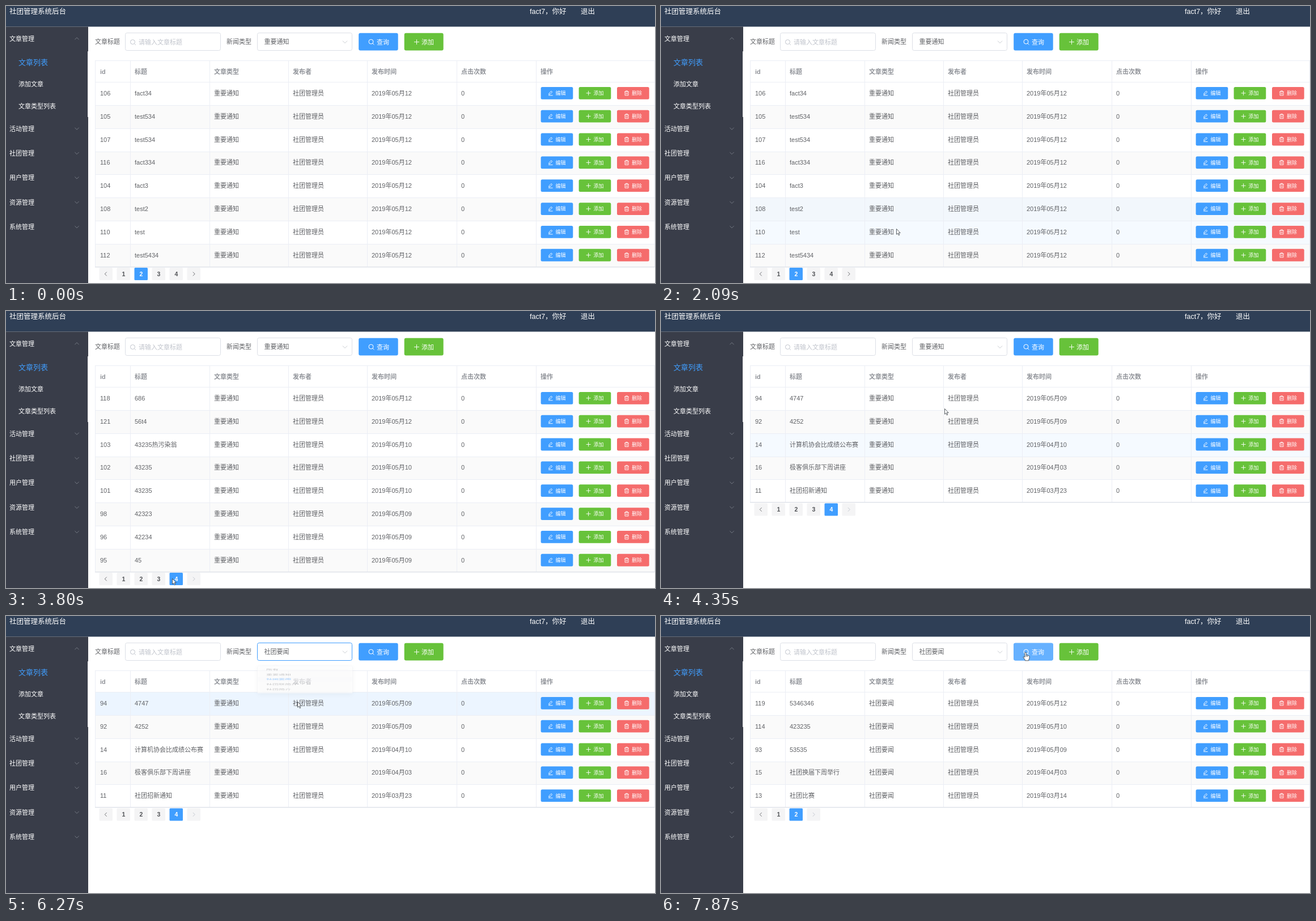
An HTML page with a canvas for the animation above (8 s loop, 1145 by 489 pixels).

```html
<!DOCTYPE html>
<html lang="zh-CN">
<head>
<meta charset="utf-8">
<title>后台列表</title>
<style>
  html, body { margin: 0; width: 100%; height: 100%; overflow: hidden; background: #fff; }
  canvas { display: block; }
</style>
</head>
<body>
<canvas id="stage" width="1145" height="489"></canvas>
<script>
const ctx = document.getElementById('stage').getContext('2d');
const FONT = '"Liberation Sans", "Noto Sans CJK SC", "Noto Sans CJK", sans-serif';
const LOOP = 8000, STEP = 77.9, ROW_H = 40.85, TOP = 134;
const BLUE = '#409eff', GREEN = '#67c23a', RED = '#f56c6c';
const INK = '#606266', PALE = '#c0c4cc', RULE = '#ebeef5';
const COLS = [157, 219, 359, 498, 637, 795, 935];
const HEADS = ['id', '标题', '文章类型', '发布者', '发布时间', '点击次数', '操作'];
const OPTIONS = ['所有', '重要通知', '社团要闻', '社团联简介', '社团简介'];
const NOTICE = OPTIONS[1], NEWS = OPTIONS[2];

// Each row: id, title, date, optional "-" for no publisher
const table = (type, pages, page, text) => ({
  type, pages, page, rows: text.split('|').map(r => r.split(' '))
});
const SECOND = table(NOTICE, 4, 2, '106 fact34 05月12|105 test534 05月12|107 test534 05月12|116 fact334 05月12|' +
  '104 fact3 05月12|108 test2 05月12|110 test 05月12|112 test5434 05月12');
const THIRD = table(NOTICE, 4, 3, '118 686 05月12|121 56t4 05月12|103 43235热污染翁 05月10|102 43235 05月10|' +
  '101 43235 05月10|98 42323 05月09|96 42234 05月09|95 45 05月09');
const FOURTH = table(NOTICE, 4, 4, '94 4747 05月09|92 4252 05月09|14 计算机协会比成绩公布赛 04月10|' +
  '16 极客俱乐部下周讲座 04月03 -|11 社团招新通知 03月23');
const LATEST = table(NEWS, 2, 2, '119 5346346 05月12|114 423235 05月10|93 53535 05月09|' +
  '15 社团换届下周举行 04月03|13 社团比赛 03月14');

// Pointer path: time, x, y
const PATH = [
  [230, 420, 452], [620, 455, 270], [1010, 540, 85], [1245, 592, 74], [1320, 631, 67],
  [1400, 630, 72], [1860, 470, 366], [2300, 370, 415], [2720, 270, 472], [3345, 270, 472],
  [3570, 293, 472], [3980, 293, 472], [4362, 499.5, 172], [4750, 512, 72], [4985, 512, 72],
  [5500, 512, 101], [5600, 512, 101], [5780, 498, 135], [5930, 490, 160], [6080, 490, 160],
  [6400, 540, 142], [6870, 647, 66], [6950, 645, 63], [7760, 645, 63], [7780, 643, 64]
];

function pointer(t) {
  if (t < 225) return null;
  const i = PATH.findIndex(p => p[0] > t);
  if (i === 0) return PATH[0].slice(1);
  if (i < 0) return PATH[PATH.length - 1].slice(1);
  const [a, b] = [PATH[i - 1], PATH[i]], f = (t - a[0]) / (b[0] - a[0]);
  return [a[1] + (b[1] - a[1]) * f, a[2] + (b[2] - a[2]) * f];
}

const isOpen = t => t > 4980 && t < 6070;
const dataAt = t => t < 2865 ? SECOND : t < 3800 ? THIRD : t < 7240 ? FOURTH : LATEST;
const pageAt = t => t < 2785 ? 2 : t < 3725 ? 3 : t < 7240 ? 4 : 2;
const bottomOf = d => TOP + ROW_H * d.rows.length;

// What lies under the pointer at time t
function under(t) {
  const p = pointer(t);
  if (!p) return '';
  const [x, y] = p, data = dataAt(t), end = bottomOf(data);
  if (y > 47 && y < 79) {
    if (x > 443 && x < 611) return 'select';
    if (x > 622 && x < 692) return 'search';
  }
  if (isOpen(t) && x > 443 && x < 611 && y > 88 && y < 229)
    return 'option' + Math.max(0, Math.min(4, Math.floor((y - 93) / 26.1)));
  if (y > TOP && y < end) return 'row' + Math.floor((y - TOP) / ROW_H);
  const n = Math.round((x - 207.5) / 31) + 1;
  if (Math.abs(y - end - 12) < 11 && n > 0 && n <= data.pages && n !== pageAt(t)) return 'page' + n;
  return '';
}

// Hover strength, trailing the pointer by one step
function glow(id, k) {
  let a = 0;
  for (let j = 6; j > 0; j--)
    a = Math.max(0, Math.min(1, a + (under((k - j) * STEP) === id ? .5 : -.5)));
  return a;
}

function text(s, x, cy, color = INK, size = 11, weight = 400, align = 'left') {
  ctx.font = `${weight} ${size}px ${FONT}`;
  ctx.textAlign = align;
  ctx.fillStyle = color;
  ctx.fillText(s, x, cy + size * .37);
}

function rect(x, y, w, h, color) {
  ctx.fillStyle = color;
  ctx.fillRect(x, y, w, h);
}

function box(x, y, w, h, r, fill, stroke) {
  ctx.beginPath();
  ctx.roundRect(x, y, w, h, r);
  if (fill) { ctx.fillStyle = fill; ctx.fill(); }
  if (stroke) { ctx.strokeStyle = stroke; ctx.lineWidth = 1; ctx.stroke(); }
}

function line(color, ...pts) {
  ctx.beginPath();
  for (let i = 0; i < pts.length; i += 2) ctx.lineTo(pts[i], pts[i + 1]);
  ctx.strokeStyle = color;
  ctx.lineWidth = .9;
  ctx.stroke();
}

function faded(alpha, draw) {
  if (alpha <= 0) return;
  ctx.save();
  ctx.globalAlpha = alpha;
  draw();
  ctx.restore();
}

const chevron = (x, y, dir, color, s = 3.6) =>
  line(color, x - s, y - dir * s / 2, x, y + dir * s / 2, x + s, y - dir * s / 2);
const angle = (x, y, dir, color) =>
  line(color, x - dir * 1.7, y - 3.4, x + dir * 1.7, y, x - dir * 1.7, y + 3.4);

const icons = {
  search(x, y, c) {
    ctx.beginPath();
    ctx.arc(x - .5, y - .5, 4, 0, 7);
    ctx.strokeStyle = c;
    ctx.lineWidth = 1;
    ctx.stroke();
    line(c, x + 2.5, y + 2.5, x + 5, y + 5);
  },
  plus(x, y, c, s = 4) {
    line(c, x - s, y, x + s, y);
    line(c, x, y - s, x, y + s);
  },
  edit(x, y, c) {
    line(c, x - 3, y + 2.5, x - 2.3, y, x + 1.3, y - 3.7, x + 3, y - 2, x - .6, y + 1.8, x - 3, y + 2.5);
    line(c, x - 3.5, y + 4, x + 4, y + 4);
  },
  trash(x, y, c) {
    line(c, x - 4, y - 2.5, x + 4, y - 2.5);
    line(c, x - 1.5, y - 2.5, x - 1.5, y - 4, x + 1.5, y - 4, x + 1.5, y - 2.5);
    line(c, x - 3, y - 2.5, x - 3, y + 4, x + 3, y + 4, x + 3, y - 2.5);
    line(c, x - 1, y - .5, x - 1, y + 2.3);
    line(c, x + 1, y - .5, x + 1, y + 2.3);
  }
};

function frameUi() {
  rect(0, 0, 1145, 489, '#fff');
  rect(0, 0, 1145, 36.5, '#2f3f56');
  text('社团管理系统后台', 6, 9, '#fff', 12.5);
  text('fact7，你好', 924, 9, '#fff', 12.5);
  text('退出', 1014, 9, '#fff', 12.5);

  rect(0, 36.5, 145, 452.5, '#393d49');
  rect(144, 80, 1, 116, '#e6e6e6');
  text('文章管理', 6, 57.5, '#fff');
  chevron(125, 57.5, -1, '#7b7f89');
  text('文章列表', 22, 99, BLUE, 13);
  text('添加文章', 22, 137.5, '#fff');
  text('文章类型列表', 22, 176.5, '#fff');
  ['活动管理', '社团管理', '用户管理', '资源管理', '系统管理'].forEach((s, i) => {
    const y = 216.5 + i * 43.4;
    text(s, 6, y, '#fff');
    chevron(125, y, 1, '#7b7f89');
  });
}

function filters(t, k) {
  const focus = t > 4980 && t < 7150;
  text('文章标题', 157, 63);
  box(210.5, 47.5, 168, 31, 3, '#fff', '#dcdfe6');
  icons.search(224, 64, PALE);
  text('请输入文章标题', 234, 63.5, PALE);
  text('新闻类型', 389, 63);
  const hot = under(t) === 'select' || glow('select', k) > 0;
  box(443.5, 47.5, 167, 31, 3, '#fff', focus ? BLUE : hot ? PALE : '#dcdfe6');
  text(t < 6070 ? NOTICE : NEWS, 455.5, 63);
  chevron(598, 63.5, isOpen(t) ? -1 : 1, PALE, 4);

  box(622.2, 47.7, 69.5, 30.8, 3, BLUE);
  faded(glow('search', k), () => box(622.2, 47.7, 69.5, 30.8, 3, '#66b1ff'));
  icons.search(644.5, 63.5, '#fff');
  text('查询', 654, 63.5, '#fff');
  box(702.7, 47.7, 69, 30.8, 3, GREEN);
  icons.plus(724.5, 63.5, '#fff', 4.5);
  text('添加', 733, 63.5, '#fff');
}

function action(x, y, color, icon, label) {
  box(x, y - 10.9, 56.7, 21.8, 2.5, color);
  icons[icon](x + 17, y, '#fff');
  text(label, x + 26, y, '#fff', 9);
}

function list(t, k) {
  const data = dataAt(t), end = bottomOf(data), base = Math.round(end);
  HEADS.forEach((s, i) => text(s, COLS[i] + (i ? 8 : 9), 115.5, '#909399', 11, 700));
  data.rows.forEach((r, i) => {
    const y = Math.round(TOP + i * ROW_H), cy = 153.8 + i * ROW_H;
    if (i % 2) rect(157, y, 987, 41, '#fafafa');
    faded(glow('row' + i, k), () => rect(157, y, 987, 41, '#ecf5ff'));
    rect(157, y, 987, 1, RULE);
    const cells = [r[0], r[1], data.type, r[3] ? '' : '社团管理员', '2019年' + r[2], '0'];
    cells.forEach((s, c) => text(s, COLS[c] + (c ? 8 : 9), cy));
    action(943.6, cy, BLUE, 'edit', '编辑');
    action(1010.6, cy, GREEN, 'plus', '添加');
    action(1078, cy, RED, 'trash', '删除');
  });
  rect(157, 96, 987, 1, RULE);
  for (const x of [...COLS, 1144]) rect(x, 96, 1, base - 96, RULE);
  rect(157, base - 1, 987, 1.5, '#e0e3ea');
  pager(data, pageAt(t), end + 12.2, k);
}

function pager(data, page, y, k) {
  const last = data.pages + 1;
  for (let i = 0; i <= last; i++) {
    const x = 176.5 + i * 31, on = i === page;
    box(x - 12, y - 11, 23.5, 22, 1.5, on ? BLUE : '#f4f4f5');
    if (i === 0) angle(x - .5, y, -1, INK);
    else if (i === last) angle(x, y, 1, page === data.pages ? PALE : INK);
    else {
      text(i, x, y, on ? '#fff' : '#505256', 10.5, 700, 'center');
      if (!on) faded(glow('page' + i, k), () => text(i, x, y, BLUE, 10.5, 700, 'center'));
    }
  }
}

function dropdown(t) {
  const f = isOpen(t) ? Math.min(1, (t - 4950) / 300) : t > 6000 ? Math.max(0, 1 - (t - 6050) / 300) : 0;
  const ease = f * f * (3 - 2 * f), chosen = t < 6070 ? 1 : 2;
  const id = under(t), hover = id.startsWith('option') ? +id[6] : chosen;
  faded(ease, () => {
    ctx.translate(0, 88);
    ctx.scale(1, ease);
    ctx.translate(0, -88);
    ctx.shadowColor = 'rgba(0,0,0,.13)';
    ctx.shadowBlur = 10;
    ctx.shadowOffsetY = 2;
    box(443.5, 88.5, 168, 141, 3, '#fff');
    ctx.shadowColor = 'transparent';
    box(443.5, 88.5, 168, 141, 3, '#fff', '#e4e7ed');
    ctx.beginPath();
    ctx.moveTo(470.5, 89.2);
    ctx.lineTo(475.5, 84);
    ctx.lineTo(480.5, 89.2);
    ctx.fillStyle = '#fff';
    ctx.fill();
    line('#e4e7ed', 470.5, 88.5, 475.5, 83.5, 480.5, 88.5);
    OPTIONS.forEach((s, i) => {
      const y = 106 + i * 26.15;
      if (i === hover) rect(444, y - 13, 167, 26, '#f5f7fa');
      text(s, 459, y, i === chosen ? BLUE : INK, 11, i === chosen ? 700 : 400);
    });
  });
}

const ARROW = new Path2D('M.5 .5V10.2L2.6 8.2L4.3 11.8L5.8 11.1L4.2 7.6H7.2Z');
const HAND = new Path2D('M-1.2 9V1.2Q-1.2 .2 0 .2T1.2 1.2V5Q3 4.3 3.6 5.5Q5 5 5.5 6.2' +
  'Q7 6 7 7.5V10Q6.8 12 5.8 13V14.8H-.8V13.2L-3.9 9Q-4 7.5-2.8 7.7Z');

function cursor(t) {
  const p = pointer(t);
  if (!p) return;
  const shape = /select|search|option|page/.test(under(t)) ? HAND : ARROW;
  const edge = '#333a40';
  ctx.save();
  ctx.translate(Math.round(p[0]), Math.round(p[1]));
  ctx.fillStyle = '#fff';
  ctx.strokeStyle = edge;
  ctx.lineWidth = .8;
  ctx.fill(shape);
  ctx.stroke(shape);
  if (shape === HAND) {
    line(edge, 1.2, 5, 1.2, 8);
    line(edge, 3.5, 5.8, 3.5, 8);
  }
  ctx.restore();
}

const start = performance.now();

function draw() {
  const now = (performance.now() - start) % LOOP;
  const k = Math.floor((now + 15) / STEP), t = k * STEP;
  frameUi();
  filters(t, k);
  list(t, k);
  dropdown(t);
  cursor(t);
  requestAnimationFrame(draw);
}

draw();
</script>
</body>
</html>
```
